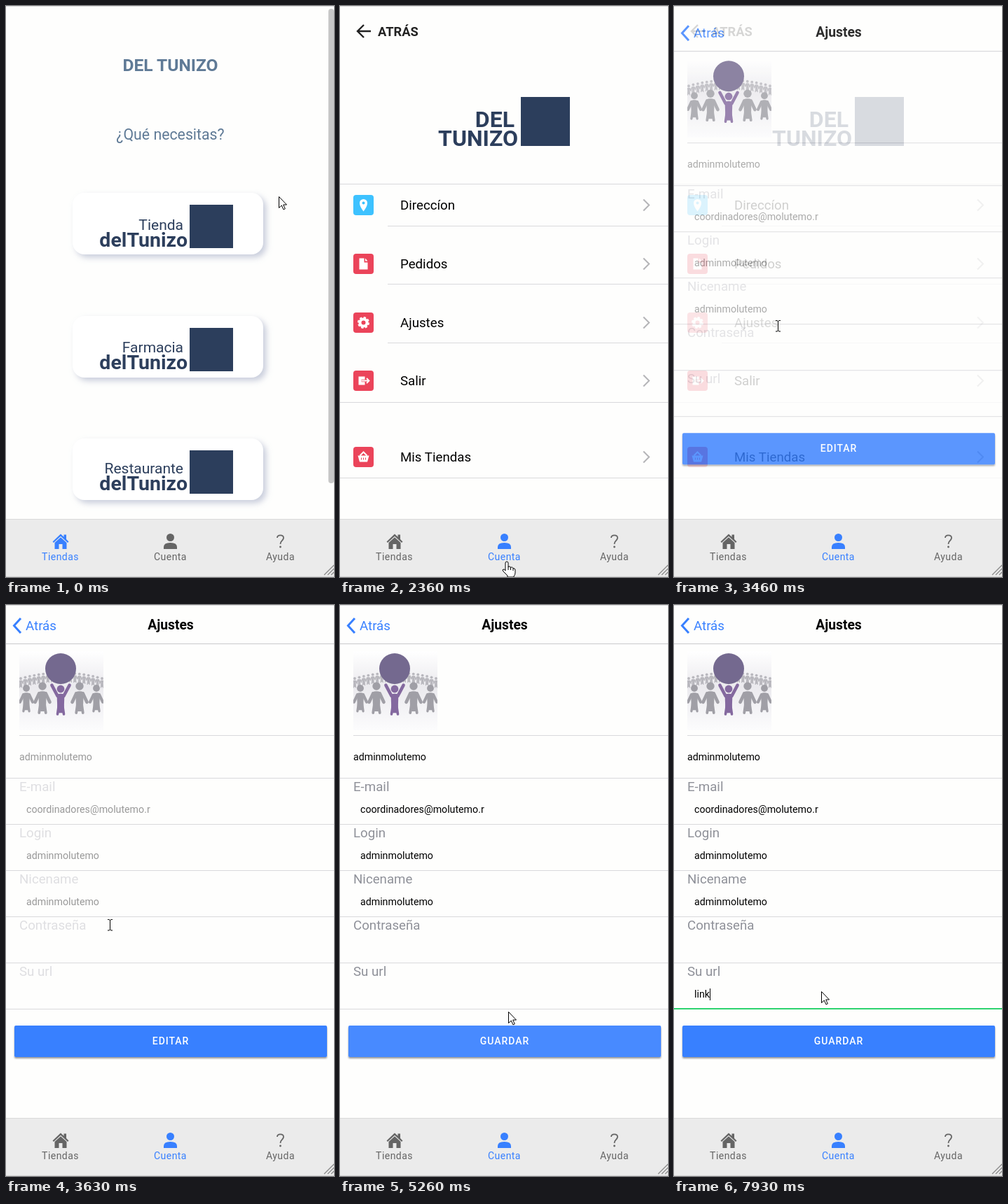
Recreate the animation shown at these times as an HTML page. Size 468 px wide and 816 px high, loop 8000 ms.

```html
<!DOCTYPE html>
<html lang="es">
<head>
<meta charset="utf-8">
<title>Tienda</title>
<style>
  html, body { margin: 0; width: 100%; height: 100%; overflow: hidden; background: #fefefd; }
  svg { display: block; font-family: Roboto, sans-serif; }
  .bold { font-weight: 700; }
  .medium { font-weight: 500; }
  .field-label { font-size: 18.7px; fill: #8f9199; }
  .field-value { font-size: 14.2px; fill: #000; }
  .disabled .field-label { fill: #dfdfe2; }
  .disabled .field-value { fill: #999; }
</style>
</head>
<body>
<svg id="stage" width="468" height="816" viewBox="0 0 468 816">
  <defs>
    <filter id="cardShadow" x="-20%" y="-30%" width="140%" height="170%">
      <feDropShadow dx="4.5" dy="4.5" stdDeviation="4.5" flood-color="#c3c8d8" flood-opacity=".9"/>
    </filter>
    <filter id="buttonShadow" x="-5%" y="-20%" width="110%" height="150%">
      <feDropShadow dx="0" dy="2" stdDeviation="1.3" flood-color="#000" flood-opacity=".4"/>
    </filter>
    <linearGradient id="photoTone" x2="0" y2="1">
      <stop offset="0" stop-color="#fff"/>
      <stop offset=".45" stop-color="#ebeaee"/>
      <stop offset="1" stop-color="#fcfcfd"/>
    </linearGradient>
    <clipPath id="tabClip"><rect x="156" y="734" width="157" height="81"/></clipPath>
    <clipPath id="buttonClip"><rect x="12" y="601" width="446" height="45" rx="2"/></clipPath>
    <clipPath id="photoClip"><rect x="19" y="66" width="120" height="113"/></clipPath>
  </defs>
  <rect width="468" height="816" fill="#fefefd"/>
  <g id="home"></g>
  <g id="account"></g>
  <g id="settings"></g>
  <g id="tabs"></g>
  <path d="M0 .5H468" stroke="#dcdcdc"/>
  <g id="pointer" stroke="#000" fill="#fff" stroke-linejoin="round"></g>
</svg>
<script>
const LOOP = 8000;
const BLUE = '#3880ff', NAVY = '#2c3e5c', SLATE = '#5f7a96', GREY = '#656565', RED = '#eb445a';
const byId = id => document.getElementById(id);
const fill = (id, markup) => { byId(id).innerHTML = markup; };
const show = (el, on) => el.setAttribute('display', on ? 'inline' : 'none');

const text = (x, y, size, color, str, extra = '') =>
  `<text x="${x}" y="${y}" font-size="${size}" fill="${color}" ${extra}>${str}</text>`;
const line = (x, y, color = '#d9d9dc') => `<path d="M${x} ${y + .5}H468" stroke="${color}"/>`;
const square = (x, y, size) => `<rect x="${x}" y="${y}" width="${size}" height="${size}" fill="${NAVY}"/>`;
const middle = 'text-anchor="middle"', end = 'text-anchor="end"', bold = 'class="bold"';

// Home page
const card = (y, kind, i) => {
  const base = Math.round(y + 53 - 1.4 * i);
  return `<rect x="95" y="${y}" width="272" height="88" rx="17" fill="#fff" filter="url(#cardShadow)"/>`
    + text(253, base, 21, NAVY, kind, end)
    + text(259, base + 24, 28.5, NAVY, 'delTunizo', `${end} ${bold}`)
    + square(262, y + 17, 62);
};
fill('home',
  text(234.5, 93, 24.6, SLATE, 'DEL TUNIZO', `${middle} ${bold}`)
  + text(234.5, 191, 21.3, SLATE, '¿Qué necesitas?', middle)
  + ['Tienda', 'Farmacia', 'Restaurante'].map((kind, i) => card(Math.round(267 + 175.5 * i), kind, i)).join('')
  + '<rect x="460" y="4" width="8" height="678" rx="4" fill="#c7c7c7"/>');

// Account page
const glyphs = {
  pin: '<path d="M0 9C-3 5-5.5 1-5.5-3A5.5 5.5 0 0 1 5.5-3C5.5 1 3 5 0 9Z" fill="#fff"/><circle cy="-3" r="2" fill="#3dc2ff"/>',
  file: '<path d="M-6-8H1V-2H6V8H-6Z" fill="#fff"/><path d="M2.5-8L6-4H2.5Z" fill="#fff"/>',
  gear: '<circle r="5" fill="none" stroke="#fff" stroke-width="4"/><circle r="7.5" fill="none" stroke="#fff" stroke-width="2" stroke-dasharray="3.4 2.49"/>',
  exit: `<path d="M-7-6H2V6H-7Z" fill="#fff"/><path d="M-3 0H4" stroke="${RED}" stroke-width="3.5"/><path d="M-3 0H8M4.5-3.5L8 0L4.5 3.5" fill="none" stroke="#fff" stroke-width="1.8"/>`,
  basket: `<path d="M-8-2H8L5.5 7H-5.5Z" fill="#fff"/><path d="M-5-2L0-7L5-2" fill="none" stroke="#fff" stroke-width="2"/><path d="M-3 1V4M0 1V4M3 1V4" stroke="${RED}"/>`
};
const rows = [
  { y: 284.5, top: 255, bottom: 314, label: 'Direccíon', icon: 'pin', color: '#3dc2ff' },
  { y: 368.5, top: 315, bottom: 397, label: 'Pedidos', icon: 'file' },
  { y: 452.5, top: 398, bottom: 481, label: 'Ajustes', icon: 'gear' },
  { y: 535.5, top: 482, bottom: 566, label: 'Salir', icon: 'exit' },
  { y: 644.5, top: 615, bottom: 674, label: 'Mis Tiendas', icon: 'basket' }
];
const rowMarkup = r =>
  `<g class="row"><g transform="translate(33.5 ${r.y})">
    <rect x="-14.5" y="-14.5" width="29" height="29" rx="4" fill="${r.color || RED}"/>${glyphs[r.icon]}</g>`
  + text(86, r.y + 6.5, 18.7, '#000', r.label)
  + `<path d="M433 ${r.y - 8}l8 8l-8 8" fill="none" stroke="#b4b4b7" stroke-width="2"/></g>`
  + line(r.bottom > 500 ? 0 : 68, r.bottom);
fill('account',
  '<path d="M44 36H25M34 27L25 36L34 45" fill="none" stroke="#222" stroke-width="2.4"/>'
  + text(54, 43, 18.3, '#222', 'ATRÁS', bold)
  + text(249, 172.5, 32, NAVY, 'DEL', `${end} ${bold}`)
  + text(254, 200, 32, NAVY, 'TUNIZO', `${end} ${bold}`)
  + square(258, 130, 70) + line(0, 254)
  + rows.map(rowMarkup).join(''));
const rowEls = document.querySelectorAll('.row');

// Settings page
const figure = (x, y, s, color, arms) =>
  `<g transform="translate(${x} ${y}) scale(${s})" fill="${color}" stroke="${color}" stroke-linecap="round">
    <circle r="6" stroke="none"/><path d="M-6 9Q0 6 6 9L5 38H-5Z" stroke="none"/>
    <path d="M-5 11L${arms}M5 11L${arms.replace('-', '')}" fill="none" stroke-width="5"/>
    <path d="M-3 26L-5 40M3 26L5 40" stroke-width="4"/></g>`;
const crowd = Array.from({ length: 19 }, (_, i) => {
  const u = i / 9 - 1;
  return figure(79 + 58 * u, 97 + 8 * u * u, .32, '#b9b8be', '-10 22');
}).join('');
const photo = `<g clip-path="url(#photoClip)"><rect x="19" y="66" width="120" height="113" fill="url(#photoTone)"/>${crowd}`
  + [[29, 119, .82], [129, 119, .82], [52, 116, .95], [105, 116, .95]]
    .map(([x, y, s]) => figure(x, y, s, '#a09fa6', '-11 24')).join('')
  + figure(78, 120, .9, '#84699f', '-14 -6') + '<circle cx="78" cy="91" r="22" fill="#74698f"/></g>';

const user = 'adminmolutemo';
const fields = [['E-mail', 'coordinadores@molutemo.r'], ['Login', user], ['Nicename', user], ['Contraseña', ''], ['Su url', '']];
const fieldMarkup = ([label, value], i) => {
  const y = 247 + 66 * i;
  return line(0, y) + `<text class="field-label" x="19" y="${y + 19}">${label}</text>
    <text class="field-value" x="29" y="${y + 50}">${value}</text>`;
};
fill('settings',
  '<rect y="1" width="468" height="732" fill="#fefefd"/>'
  + `<path d="M21 19L11.5 29.5L21 40" fill="none" stroke="${BLUE}" stroke-width="3"/>`
  + text(28, 36, 18.7, BLUE, 'Atrás')
  + text(235, 35, 19.3, '#000', 'Ajustes', `${middle} ${bold}`)
  + line(0, 55, '#c9c9cc') + photo + line(19, 186)
  + `<g id="form"><text class="field-value" x="19" y="222">${user}</text>${fields.map(fieldMarkup).join('')}</g>`
  + line(0, 577)
  + '<rect id="focus" y="576" width="468" height="2" fill="#2dd36f"/>'
  + '<text id="typed" class="field-value" x="29" y="561"></text>'
  + '<path id="caret" d="M.5 548V565" stroke="#000"/>'
  + '<rect id="button" x="12" y="601" width="446" height="45" rx="2" filter="url(#buttonShadow)"/>'
  + '<circle id="buttonRipple" cx="267" cy="627" fill="#fff" clip-path="url(#buttonClip)"/>'
  + text(235, 628, 14, '#fff', '', `id="action" class="medium" letter-spacing="1" ${middle}`));

// Tab bar
const tabLabel = (x, str) => text(x, 792, 14, 'currentColor', str, `${middle} letter-spacing=".45"`);
fill('tabs',
  '<rect y="733" width="468" height="82" fill="#ebebeb"/>' + line(0, 733, '#dadada') + line(0, 815, '#d6d6d6')
  + `<circle id="tabRipple" cx="234.5" cy="775" fill="${BLUE}" clip-path="url(#tabClip)"/>`
  + `<g id="storesTab"><path d="M66.5 765.5L78 754.5L82.5 758.7V755.5H86V762L89.5 765.5L88 767L78 757.7L68 767Z" fill="currentColor"/>
     <path d="M69.5 767L78 759.2L86.5 767V776H80.5V769H75.5V776H69.5Z" fill="currentColor"/>${tabLabel(77.5, 'Tiendas')}</g>`
  + `<g id="accountTab"><circle cx="234.5" cy="759.5" r="5.5" fill="currentColor"/>
     <path d="M225 776V773Q225 767 234.5 767T244 773V776Z" fill="currentColor"/>${tabLabel(234.5, 'Cuenta')}</g>`
  + `<g color="${GREY}"><path d="M387 760Q387 756.3 391.5 756.3T396 760C396 764 391.5 764 391.5 769" fill="none" stroke="currentColor" stroke-width="1.8"/>
     <circle cx="391.5" cy="773" r="1.4" fill="currentColor"/>${tabLabel(391.5, 'Ayuda')}</g>`
  + '<path d="M454 813L468 799M459 813L468 804M464 813L468 809" stroke="#8a8a8a" stroke-width="1.3"/>');

// Pointer
const shapes = {
  arrow: '<path d="M.5 .5V16.5L4.3 13L6.9 18.8L9.3 17.8L6.7 12H11.5Z"/>',
  hand: '<path d="M-2 2Q-2 0 0 0T2 2V8Q2 6.5 4 7T5.5 9Q6 7.5 7.5 8T9 10Q10 9 11 10T12 12V16Q12 19 10 21V22H1V20L-5 14Q-7 11.5-5 11T-2 13Z"/><path d="M2 8V12M5.5 9V12M9 10V13" fill="none"/>',
  beam: '<path d="M-3-7.5H-1L.5-6.5L2-7.5H4M.5-6.5V7M-3 8H-1L.5 7L2 8H4" fill="none"/>'
};
fill('pointer', Object.entries(shapes).map(([name, d]) => `<g id="${name}">${d}</g>`).join(''));

const path = [
  [0, 389, 272], [100, 389, 272], [900, 322, 634], [930, 322, 635], [1330, 238, 794],
  [2360, 238, 794], [3000, 148, 457], [3640, 148, 457], [4160, 190, 513], [4200, 191, 514],
  [4630, 267, 627], [5000, 267, 627], [5360, 234, 571], [5500, 234, 571], [5930, 211, 553],
  [6499, 211, 553], [6500, 210, 552], [LOOP, 210, 552]
];
const clamp = v => Math.min(1, Math.max(0, v));
const smooth = u => u * u * (3 - 2 * u);
function pointerAt(t) {
  const i = path.findIndex(p => p[0] > t);
  const [t0, x0, y0] = path[i - 1], [t1, x1, y1] = path[i];
  const k = smooth((t - t0) / (t1 - t0));
  return [Math.round(x0 + (x1 - x0) * k), Math.round(y0 + (y1 - y0) * k)];
}

function ripple(id, t, start, r0, r1, peak) {
  const u = (t - start) / 450, el = byId(id);
  show(el, u >= 0 && u < 1);
  el.setAttribute('r', r0 + (r1 - r0) * (1 - (1 - clamp(u * 1.7)) ** 2));
  el.setAttribute('opacity', peak * clamp(u * 5) * clamp((1 - u) * 2.5));
}

const typedAt = t => 'link'.slice(0, [7230, 7430, 7660, 7930].filter(k => t >= k).length);

function render(t) {
  const [x, y] = pointerAt(t);
  const onAccount = t >= 1600, onSettings = t >= 3360, editing = t >= 4960;

  show(byId('home'), !onAccount);
  show(byId('account'), onAccount && t < 3640);
  const enter = 1 - (1 - clamp((t - 3360) / 250)) ** 3;
  const settings = byId('settings');
  show(settings, onSettings);
  settings.setAttribute('transform', `translate(0 ${43.5 * (1 - enter)})`);
  settings.setAttribute('opacity', .14 + .86 * enter);

  const hovered = onAccount && t < 3640 ? rows.findIndex(r => y >= r.top && y <= r.bottom) : -1;
  rowEls.forEach((el, i) => el.setAttribute('opacity', i === hovered ? .76 : 1));

  const overTabs = y > 733, overButton = t > 3700 && y >= 601 && y < 646;
  byId('storesTab').setAttribute('color', onAccount ? GREY : BLUE);
  byId('accountTab').setAttribute('color', onAccount || overTabs ? BLUE : GREY);
  ripple('tabRipple', t, 1560, 39, 78, .14);

  byId('form').setAttribute('class', editing ? '' : 'disabled');
  byId('button').setAttribute('fill', overButton ? '#4c8dff' : BLUE);
  byId('action').textContent = editing ? 'GUARDAR' : 'EDITAR';
  ripple('buttonRipple', t, 4900, 60, 300, .16);

  const typed = byId('typed'), caret = byId('caret');
  typed.textContent = typedAt(t);
  show(byId('focus'), t >= 6160);
  show(caret, (t >= 6160 && t < 6660) || t >= 7160);
  const advance = typed.textContent ? typed.getComputedTextLength() : 0;
  caret.setAttribute('transform', `translate(${Math.round(29 + advance)} 0)`);

  const kind = overTabs || overButton || (!onSettings && hovered >= 0) ? 'hand'
    : onSettings && y < 470 ? 'beam' : 'arrow';
  Object.keys(shapes).forEach(name => show(byId(name), name === kind));
  byId('pointer').setAttribute('transform', `translate(${x} ${y})`);
}

const began = performance.now();
function tick() {
  render((performance.now() - began) % LOOP);
  requestAnimationFrame(tick);
}
tick();
</script>
</body>
</html>
```
